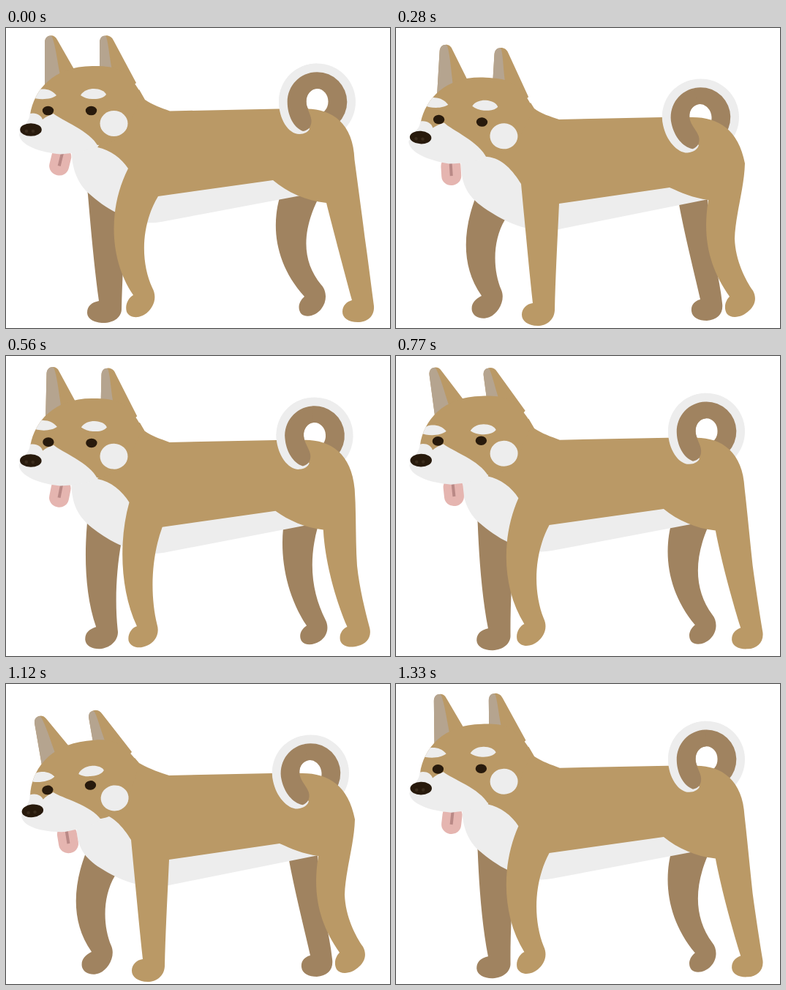
These frames come from a looping animation (525 px wide and 410 px high, 1.4 s). An HTML page:

```html
<!DOCTYPE html>
<html lang="en">
<head>
<meta charset="utf-8">
<title>Walking dog</title>
<style>
  html, body { margin: 0; width: 100%; height: 100%; overflow: hidden; background: #fff; }
  svg { display: block; width: 525px; height: 410px; }
  .tan { fill: #ba9966; }
  .shade { fill: #a08360; }
  .pale { fill: #ededed; }
  .inner { fill: #b5a48f; }
  .dark { fill: #281a0c; }
</style>
</head>
<body>
<svg viewBox="0 0 525 410">
  <defs>
    <path id="skull" d="M33,118 C38,85 65,52 118,52 C145,52 164,52 186,92 L165,140 C158,150 145,158 126,160 L60,150 Z"/>
    <clipPath id="inSkull"><use href="#skull"/></clipPath>
  </defs>

  <path id="farFront" class="shade"/>
  <path id="farHind" class="shade"/>
  <g class="tail">
    <circle class="pale" cx="425.5" cy="101" r="52.5"/>
    <circle class="shade" cx="425.5" cy="101" r="40.8"/>
    <ellipse fill="#fff" cx="425.5" cy="100.5" rx="15" ry="17.5"/>
  </g>
  <path id="belly" class="pale"/>
  <path id="body" class="tan"/>
  <g class="tail">
    <path class="pale" d="M425,48.5 C396,48.5 373,71 373,101 C373,124 386,145 401,145 C408,145 413,142 415,138 L400,110 L400,70 L425,61 Z"/>
    <path class="shade" d="M425,60.2 C402,60.2 384.7,79 384.7,101 C384.7,119 393,136 406,141 C414,140 418,134 417.5,126 C417,118 410.5,110 410.5,100 C410.5,90 417,83 425,83 Z"/>
  </g>

  <g id="head">
    <g id="tongue">
      <rect x="63.5" y="163" width="27" height="39" rx="13" fill="#e5b5b0"/>
      <path d="M77,166 V189" stroke="#b98986" stroke-width="4"/>
    </g>
    <g id="earL">
      <path class="tan" d="M53,84 V20 C53,9 66,7 70,16 L94,58 L80,84 Z"/>
      <path class="inner" d="M53,84 V20 C53,11 60,9 63,12 C68,25 70,45 75,70 Z"/>
    </g>
    <g id="earR">
      <path class="tan" d="M128,66 V20 C128,8 143,7 147,17 L178,75 L160,92 Z"/>
      <path class="inner" d="M128,66 V20 C128,11 134,9 137,12 C141,25 141,42 147,66 Z"/>
    </g>
    <use href="#skull" class="tan"/>
    <path class="pale" d="M32.5,117 C41,115 48,119 50,125 C55,121 60,119 65,117 C75,126 115,140 126,162 C110,168 95,171 75,172.5 C45,170 20,160 18,146 C22,132 32,130 32.5,117 Z"/>
    <g clip-path="url(#inSkull)">
      <g id="brows" class="pale">
        <path d="M34,94 C44,99 62,98 69,92 C64,86 58,83.5 50,83.5 C44,83 36,87 34,94 Z"/>
        <path d="M102,92 C106,85 114,83 120,83 C128,83 135,86 137,91 C132,97 124,97 118,97 C112,97 106,95 102,92 Z"/>
      </g>
    </g>
    <ellipse id="cheek" class="pale" cx="147.5" cy="130.5" rx="19" ry="17.5"/>
    <g class="dark">
      <ellipse cx="57.5" cy="113" rx="7.7" ry="6.3"/>
      <ellipse cx="116.5" cy="113" rx="7.7" ry="6.3"/>
      <ellipse cx="34" cy="139" rx="14.8" ry="8.8"/>
    </g>
    <g fill="#3a2b1c">
      <circle cx="28" cy="141" r="2.3"/>
      <circle cx="37" cy="141" r="2.3"/>
    </g>
  </g>
</svg>
<script>
const LOOP = 1400, STEP = 70, TAU = 2 * Math.PI;
const $ = id => document.getElementById(id);
const tails = document.querySelectorAll('.tail');

// Each part: standing pose, then crouched pose(s) with head up / head down.
const bodyLow = neck => neck + ` C198,117 211,121 223,125 L364,122 L402,122
  C440,121 468,138 477,185 C476,220 464,255 463,288 C464,318 478,345 488,359
  C494,370 490,380 483,386 C473,396 458,398 452,390 C447,380 452,371 456,367
  C430,330 418,290 427,235 C405,232 390,225 374,218 L223,240
  C221,285 218,340 217,386 C216,400 205,407 194,407 C180,407 172,400 172,392
  C172,384 178,377 187,376 C182,330 176,265 171,213 C160,195 145,178 125,176 Z`;
const bellyLow = chest => chest + ` 125,249 C142,260 160,269 176,273
  C195,277 205,278 223,275 L427,234 L374,205 L223,215 L125,160 Z`;

const parts = {
  farFront: [
    `M108,200 L112,228 C116,275 121,330 127,373 C117,375 111,380 111,389
     C111,398 122,403 133,403 C148,403 158,395 158,384 C159,340 162,290 165,240 Z`,
    `M115,205 L109,231 C92,275 88,325 117,366 C107,371 102,378 104,387
     C107,396 118,399 128,395 C140,390 150,372 144,358 C132,330 132,290 149,262 Z`],
  farHind: [
    `M375,215 L374,232 C362,275 370,325 408,367 C400,374 398,384 404,391
     C412,397 425,392 431,384 C440,373 438,358 431,351 C405,320 404,280 426,235 Z`,
    `M383,220 L387,241 C395,285 408,335 416,371 C408,373 403,379 404,387
     C405,396 414,400 425,400 C440,399 448,390 446,376 C442,335 426,290 426,233 Z`],
  belly: [
    `M90,160 C88,190 98,212 112,225 C124,236 138,246 150,252
     C170,264 190,269 212,265 L403,229 L365,200 L200,200 L125,150 Z`,
    bellyLow('M89,172 C87,215 97,230'),
    bellyLow('M97,180 C94,215 102,233')],
  body: [
    `M182,84 L190,98 C200,105 212,109 224,113.5 L372,110.5 L410,110.5
     C445,110 475,130 476.5,180 C481,214 486,250 490.5,286 C495,317 499,350 503,380
     C504,394 494,402 481,402 C468,402 460,396 460,388 C460,379 466,374 473,372
     C463,335 447,275 438,239 C410,236 385,225 365,208 L208,230
     C184,270 184,320 200,355 C208,370 200,382 194,388 C185,397 170,398 165,388
     C162,378 168,368 174,365 C140,315 140,245 167,192 C158,178 143,167 125,163 Z`,
    bodyLow('M184,102 L189,110'),
    bodyLow('M176,101 L182,108')]
};

const nums = d => d.match(/[\d.]+/g).map(Number);
const mix = (a, b, u) => {
  const to = nums(b);
  let i = 0;
  return a.replace(/[\d.]+/g, n => (+n + (to[i++] - n) * u).toFixed(2));
};
const smooth = (a, b, x) => {
  x = Math.min(1, Math.max(0, (x - a) / (b - a)));
  return x * x * (3 - 2 * x);
};
const place = (el, x, y, angle = 0, cx = 0, cy = 0) =>
  el.setAttribute('transform', `translate(${x} ${y}) rotate(${angle} ${cx} ${cy})`);

function draw(k) {
  const down = k >= 10;
  const u = (1 - Math.cos(TAU * k / 10)) / 1.81;

  for (const id in parts) {
    const [stand, up, low = up] = parts[id];
    $(id).setAttribute('d', mix(stand, down ? low : up, u));
  }
  tails.forEach(el => place(el, -9 * u, 21 * u, -12 * u, 425.5, 101));

  if (down) place($('head'), -u, 25.5 * u, -6.3 * u, 116, 113);
  else place($('head'), u, 15.5 * u, 3.4 * u, 116, 113);
  place($('cheek'), 0, down ? 3.5 * u : 0);

  // Ears fold back and brows drop together.
  const frown = smooth(8, 11, k) - smooth(13, 19, k);
  place($('earL'), 0, 0, -7 * frown, 72, 72);
  place($('earR'), 0, 0, -7 * frown, 160, 80);
  place($('brows'), 0, 7.5 * frown);
  place($('tongue'), 0, 0, 3.5 + 11 * Math.cos(TAU * (3 * k / 20 - 0.05)), 77, 171);
}

const start = performance.now();
let last = -1;
function tick() {
  const k = Math.floor((performance.now() - start) % LOOP / STEP);
  if (k !== last) draw(last = k);
  requestAnimationFrame(tick);
}
tick();
</script>
</body>
</html>
```
